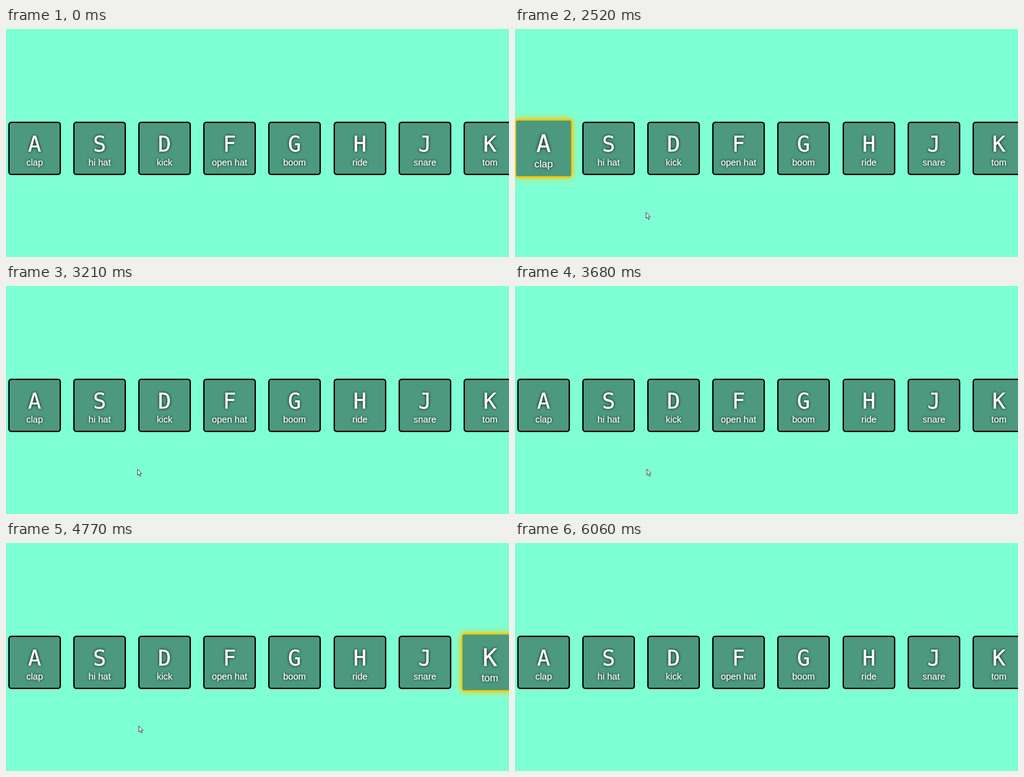
An HTML page for the animation above (6130 ms loop, 1107x506 px).

```html
<!DOCTYPE html>
<html lang="en">
<head>
<meta charset="utf-8">
<title>Drum keys</title>
<style>
  html, body { margin: 0; width: 100%; height: 100%; overflow: hidden; background: #7fffd4; }
  #stage { position: absolute; left: 0; top: 0; width: 1107px; height: 506px; overflow: hidden; }
  #edge { position: absolute; left: 0; top: 0; width: 100%; height: 2px; background: #f3f5f4; }
  .key {
    position: absolute; top: 207px; width: 116px; height: 118px; box-sizing: border-box;
    border: 3px solid #000; border-radius: 6.67px; background: rgba(0, 0, 0, .4);
    color: #fff; text-align: center; text-shadow: 0 0 6.67px #000;
  }
  .key kbd, .key span { position: absolute; left: 0; width: 100%; white-space: nowrap; }
  .key kbd { top: 22px; font: 48px/48px "DejaVu Sans Mono", monospace; -webkit-text-stroke: .5px #fff; }
  .key span { top: 75px; font: 20px/24px "Liberation Sans", Arial, sans-serif; -webkit-text-stroke: .2px #fff; }
  #cursor { position: absolute; left: 0; top: 0; width: 11px; height: 18px; overflow: visible; }
</style>
</head>
<body>
<div id="stage">
  <div id="edge"></div>
  <svg id="cursor" viewBox="0 0 11 18">
    <path d="M.5 .5V13.5L3.4 10.8L5.5 16L7.7 15.1L5.6 10.1H9.6Z" fill="#fff" stroke="#111"/>
  </svg>
</div>
<script>
const LOOP = 6130;
const STEP = 70;
const stage = document.getElementById("stage");
const cursor = document.getElementById("cursor");
const labels = ["clap", "hi hat", "kick", "open hat", "boom", "ride", "snare", "tom"];

// Plays [time, style] pairs, moving between them in jumps of one STEP.
function play(el, poses) {
  const frames = poses.map(([time, style], i) => {
    const next = poses[i + 1] || [LOOP];
    const jumps = Math.max(1, Math.round((next[0] - time) / STEP));
    return { ...style, offset: time / LOOP, easing: `steps(${jumps}, end)` };
  });
  el.animate(frames, { duration: LOOP, iterations: Infinity }).startTime = 0;
}

function glow(k) {
  return {
    transform: `scale(${1 + .1 * k})`,
    borderColor: `rgb(${255 * k}, ${198 * k}, 0)`,
    boxShadow: `0 0 ${13.33 * k}px rgba(255, 198, 0, ${k})`
  };
}

// The left half is played in a quick run, the right half more slowly.
const hitTime = i => i < 4 ? 2520 + 257 * i : 3750 + 340 * (i - 4);

labels.forEach((label, i) => {
  const el = document.createElement("div");
  el.className = "key";
  el.style.left = 5 + 143.12 * i + "px";
  el.innerHTML = `<kbd>${"ASDFGHJK"[i]}</kbd><span>${label}</span>`;
  stage.insertBefore(el, cursor);

  const hits = [hitTime(i)];
  if (i === 0) hits.push(5390);
  const poses = [[0, glow(0)]];
  for (const t of hits)
    poses.push([t - 1, glow(0)], [t, glow(1)], [t + STEP, glow(0)]);
  play(el, [...poses, [LOOP, glow(0)]]);
});

// Turning points of the pointer: time, x, y. It rests just outside the stage.
const turns = [
  [0, 1110, 510], [1050, 1110, 510], [1330, 872, 384], [1610, 460, 341],
  [1680, 317, 331], [1820, 230, 313], [1960, 188, 375], [2310, 226, 430],
  [2520, 288, 407], [4770, 292, 406], [5320, 545, 462], [5600, 900, 512],
  [LOOP, 1110, 510]
];
play(cursor, turns.map(([time, x, y]) => [time, { transform: `translate(${x}px, ${y}px)` }]));
</script>
</body>
</html>
```
